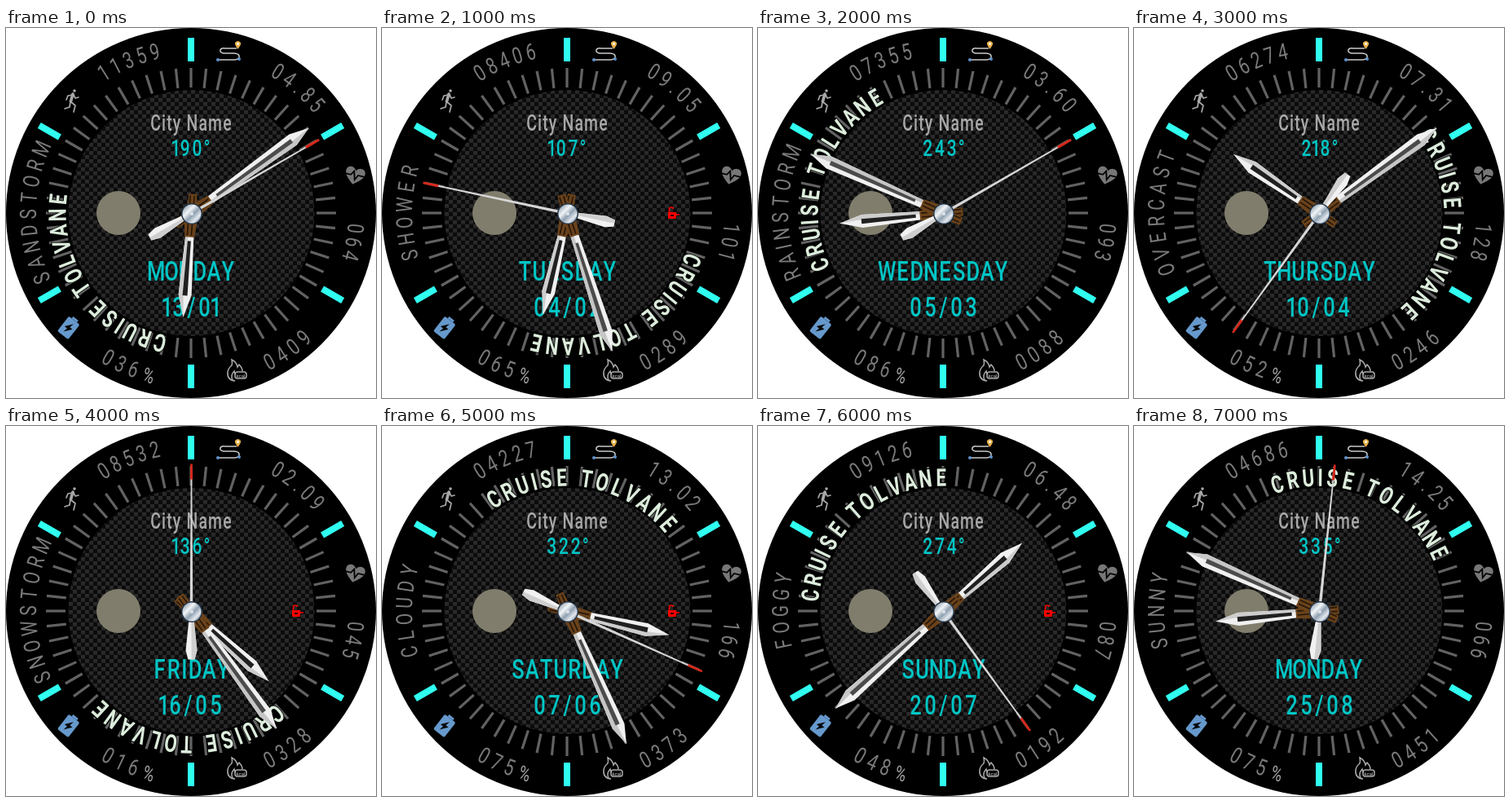
An HTML page for the animation above (8000 ms loop, 454 by 454 pixels).

```html
<!DOCTYPE html>
<html lang="en">
<head>
<meta charset="utf-8">
<title>Watch face</title>
<style>
  html, body { margin: 0; width: 100%; height: 100%; overflow: hidden; background: #fff; }
  svg { display: block; width: 454px; height: 454px; }
  text { font-family: Roboto, "Liberation Sans", sans-serif; text-anchor: middle; }
</style>
</head>
<body>
<svg viewBox="0 0 454 454" xmlns="http://www.w3.org/2000/svg">
  <defs>
    <pattern id="weave" width="10" height="10" patternUnits="userSpaceOnUse" x="2" y="1">
      <rect width="10" height="10" fill="#0b0b0b"/>
      <path d="M0 0h5v5h-5zM5 5h5v5h-5z" fill="#2b2a2b"/>
      <path d="M0 3.5h5v1.5h-5zM5 8.5h5v1.5h-5z" fill="#222"/>
    </pattern>
    <linearGradient id="steel" x1="0" y1="0" x2="1" y2="1">
      <stop offset="0" stop-color="#6f8596"/>
      <stop offset=".35" stop-color="#f2f5f8"/>
      <stop offset=".55" stop-color="#8fa0b0"/>
      <stop offset=".75" stop-color="#e3e8ee"/>
      <stop offset="1" stop-color="#4c637a"/>
    </linearGradient>
    <g id="hub">
      <circle r="13" fill="#26384a"/>
      <circle r="11.5" fill="url(#steel)"/>
      <circle r="2" fill="#dfe5ec"/>
    </g>
    <g id="grip">
      <path d="M-5 24L-6 4H6L5 24zM-8 -9L-6 -29H6L8 -9z" fill="#6a421a"/>
      <path d="M-2 -10V-27M3 -10V-27M-2 8V22M3 8V22" stroke="#24160a" stroke-width="1.6"/>
    </g>
    <g id="hour">
      <path d="M-5 -26L-8 -100L0 -128L8 -100L5 -26z" fill="#f0f0f0"/>
      <path d="M0 -128L8 -100L5 -26H2V-100z" fill="#cdcdcd"/>
      <path d="M-2 -34L-3 -101H3L2 -34z" fill="#202020"/>
      <use href="#grip"/>
    </g>
    <g id="minute">
      <path d="M-5 -27L-8 -154L0 -178L8 -154L5 -27z" fill="#f0f0f0"/>
      <path d="M0 -178L8 -154L5 -27H1V-154z" fill="#c6c6c6"/>
      <path d="M-1.5 -38L-2.5 -152H3L2 -38z" fill="#4b4b4b"/>
      <use href="#grip"/>
    </g>
    <g id="second">
      <path d="M-2.5 5L-7 48L-4 59H4L7 48L2.5 5z" fill="#f1f1f1"/>
      <path d="M0 5V59H4L7 48L2.5 5z" fill="#cfcfcf"/>
      <path d="M-1.8 0L-.8 -164H.8L1.8 0z" fill="#d6d6d6"/>
      <path d="M-1.6 -162L-1.3 -181H1.3L1.6 -162z" fill="#d6281a"/>
    </g>
  </defs>

  <circle cx="227" cy="227" r="227"/>
  <circle cx="227.5" cy="227" r="151" fill="url(#weave)"/>
  <g id="ticks"></g>

  <!-- runner -->
  <g fill="none" stroke="#a9a9a9" stroke-width="2" stroke-linecap="round" stroke-linejoin="round">
    <circle cx="84" cy="77" r="1.8" fill="#a9a9a9" stroke="none"/>
    <path d="M82 81L79.500 90" stroke-width="3.600"/>
    <path d="M82 82L76 83L74 88M83 82L85 86L89 85M80 91L85 95L83 103M79 91L78 97L72 99" stroke-width="1.700"/>
  </g>
  <!-- route -->
  <g fill="none" stroke="#c8c8c8" stroke-width="1.600">
    <path d="M261 39H281Q287 38 286 34Q285 31 279 31H267Q262 30 263 27Q264 24 269 25H283"/>
    <circle cx="260" cy="39" r="2" fill="#5f93cc" stroke="none"/>
    <circle cx="286" cy="38" r="2" fill="#5f93cc" stroke="none"/>
    <path d="M284.500 26Q280 20 281 18Q284.500 14 288 18Q289 20 284.500 26z" fill="#e6b24a" stroke="none"/>
    <circle cx="284.500" cy="19.500" r="1.400" fill="#fff" stroke="none"/>
  </g>
  <!-- heart -->
  <g transform="translate(428 181) rotate(14)">
    <path d="M0 11C-5 7 -12 2 -12 -4C-12 -11 -3 -12 0 -6C3 -12 12 -11 12 -4C12 2 5 7 0 11z" fill="#777"/>
    <path d="M-12 0H-5L-2 -5L1 5L4 -1H12" fill="none" stroke="#000" stroke-width="1.800"/>
  </g>
  <!-- battery -->
  <g transform="translate(77 367.500) rotate(38)">
    <rect x="-8.500" y="-11" width="17" height="23" rx="2" fill="#6699cc"/>
    <rect x="-4" y="-14" width="8" height="3" fill="#6699cc"/>
    <path d="M2 -7L-5 2H-1L-2 8L5 -1H1z" fill="#080808"/>
  </g>
  <!-- flame -->
  <g fill="none" stroke="#aaa" stroke-width="1.500">
    <path d="M281 433Q271 432 272 422Q273 417 277 414Q278 411 277 407Q283 410 284 416L286 413Q290 417 290 421"/>
    <path d="M278 432Q275 426 280 421Q280 424 282 425"/>
    <rect x="281" y="422" width="14" height="8" rx="3"/>
  </g>
  <text x="288" y="428.500" font-size="6" fill="#ccc">kcal</text>

  <circle cx="138" cy="227" r="27" fill="#817d6c"/>
  <text transform="translate(227.500 125.500) scale(.72 1)" font-size="27" font-weight="500" letter-spacing="1.600" fill="#a8a8a8">City Name</text>

  <g id="lock">
    <rect x="351" y="226" width="10" height="8" fill="#f00"/>
    <path d="M352.500 226V222Q352.500 220 355 220T357.500 222" fill="none" stroke="#f00" stroke-width="1.600"/>
    <path d="M361 229H365" stroke="#f00" stroke-width="1.500"/>
    <path d="M354 230H358" stroke="#300" stroke-width="2"/>
  </g>
  <g id="info"></g>
  <use id="h" href="#hour"/>
  <use id="m" href="#minute"/>
  <use id="s" href="#second"/>
  <use href="#hub" transform="translate(228 228)"/>
</svg>
<script>
const $ = id => document.getElementById(id);
const C = 227, GRAY = '#7b7b7b', CYAN = '#00c5c5';

const make = (day, date, city, steps, km, pulse, kcal, power, sky, time, arc, lock) =>
  ({ day, date, city, steps, km, pulse, kcal, power, sky, time, arc, lock });

// time: hour, minute, second; arc: middle angle of the sliding label
const views = [
  make('MONDAY', '13/01', '190°', '11359', '04.85', '064', '0409', '036', 'SANDSTORM', [6, 9, 10], 234.7, false),
  make('TUESDAY', '04/02', '107°', '08406', '09.05', '101', '0289', '065', 'SHOWER', [6, 27, 47], 152, true),
  make('WEDNESDAY', '05/03', '243°', '07355', '03.60', '093', '0088', '086', 'RAINSTORM', [8, 49, 10], 288.4, false),
  make('THURSDAY', '10/04', '218°', '06274', '07.31', '128', '0246', '052', 'OVERCAST', [10, 9, 36], 96, false),
  make('FRIDAY', '16/05', '136°', '08532', '02.09', '045', '0328', '016', 'SNOWSTORM', [4, 24, 0], 181.5, true),
  make('SATURDAY', '07/06', '322°', '04227', '13.02', '166', '0373', '075', 'CLOUDY', [3, 26, 19], 8.1, true),
  make('SUNDAY', '20/07', '274°', '09126', '06.48', '087', '0192', '048', 'FOGGY', [1, 38, 24], 318, true),
  make('MONDAY', '25/08', '335°', '04686', '14.25', '066', '0451', '075', 'SUNNY', [8, 49, 1], 23, false)
];

// Places characters side by side; gives the centre of each, balanced about zero
function centres(str, width) {
  let end = 0;
  const mids = [...str].map(c => { const w = width(c); end += w; return end - w / 2; });
  return mids.map(x => x - end / 2);
}

const pitch = c => ({ I: 9, M: 20.5, W: 21, 1: 10, '/': 14, '°': 11 })[c] || (c < 'A' ? 18 : 17.3);
const digitStep = c => c === '.' ? 3.5 : 4.8;
const skyStep = c => ({ I: 3.3, M: 6.5, W: 6.8 })[c] || 5.8;
const labelStep = c => ({ I: 3.6, ' ': 4 })[c] || 6.8;

function line(str, base, size) {
  const k = .75, xs = centres(str, c => pitch(c) * size / 34 / k);
  return `<text transform="translate(227.5 ${base}) scale(${k} 1)" x="${xs.join(' ')}"
    font-size="${size}" font-weight="500" fill="${CYAN}">${str}</text>`;
}

// Text on a circle; inward text reads the right way up along the bottom
function ring(str, mid, r, size, step, { inward = false, attr = `fill="${GRAY}"` } = {}) {
  const xs = centres(str, step);
  return [...str].map((c, i) => {
    const a = mid + (inward ? -xs[i] : xs[i]), t = a * Math.PI / 180;
    const x = C + r * Math.sin(t), y = C - r * Math.cos(t);
    return `<text transform="translate(${x} ${y}) rotate(${inward ? a + 180 : a}) scale(.75 1)"
      y="${size * .355}" font-size="${size}" ${attr}>${c}</text>`;
  }).join('');
}

function turn(id, deg) {
  $(id).setAttribute('transform', `translate(227.5 227.5) rotate(${deg})`);
}

function show(v) {
  const [h, m, s] = v.time;
  const bold = 'font-weight="700" fill="#dcecdc" stroke="#000" stroke-width="2" paint-order="stroke"';
  $('info').innerHTML =
    ring('CRUISE TOLVANE', v.arc, 164, 30, labelStep, { attr: bold }) +
    ring(v.steps, -22.3, 203, 28, digitStep) +
    ring(v.km, 40.5, 204, 28, digitStep) +
    ring(v.pulse, 100.2, 203, 28, digitStep) +
    ring(v.kcal, 145, 206, 28, digitStep, { inward: true }) +
    ring(v.power, 205, 204, 28, digitStep, { inward: true }) +
    ring('%', 194.6, 206, 25, digitStep, { inward: true, attr: 'fill="#a8a8a8"' }) +
    ring(v.sky, 270, 200, 28, skyStep) +
    line(v.city, 157, 28) + line(v.day, 310, 34) + line(v.date, 354, 34);
  $('lock').style.display = v.lock ? '' : 'none';
  turn('h', h * 30 + m / 2);
  turn('m', m * 6);
  turn('s', s * 6);
}

let ticks = '';
for (let a = 0; a < 360; a += 6) {
  const bar = (x, y, w, h, fill) =>
    `<rect x="${x}" y="${y}" width="${w}" height="${h}" fill="${fill}" transform="rotate(${a} ${C} ${C})"/>`;
  ticks += bar(225.4, 49, 3.2, 24, '#626262');
  if (a % 60 === 0) ticks += bar(223, 12, 8, 29, '#30fff0');
}
$('ticks').innerHTML = ticks;

let shown = -1;
const start = performance.now();
function frame() {
  const i = Math.floor(Math.max(0, performance.now() - start) % 8000 / 1000);
  if (i !== shown) show(views[shown = i]);
  requestAnimationFrame(frame);
}
frame();
</script>
</body>
</html>
```
